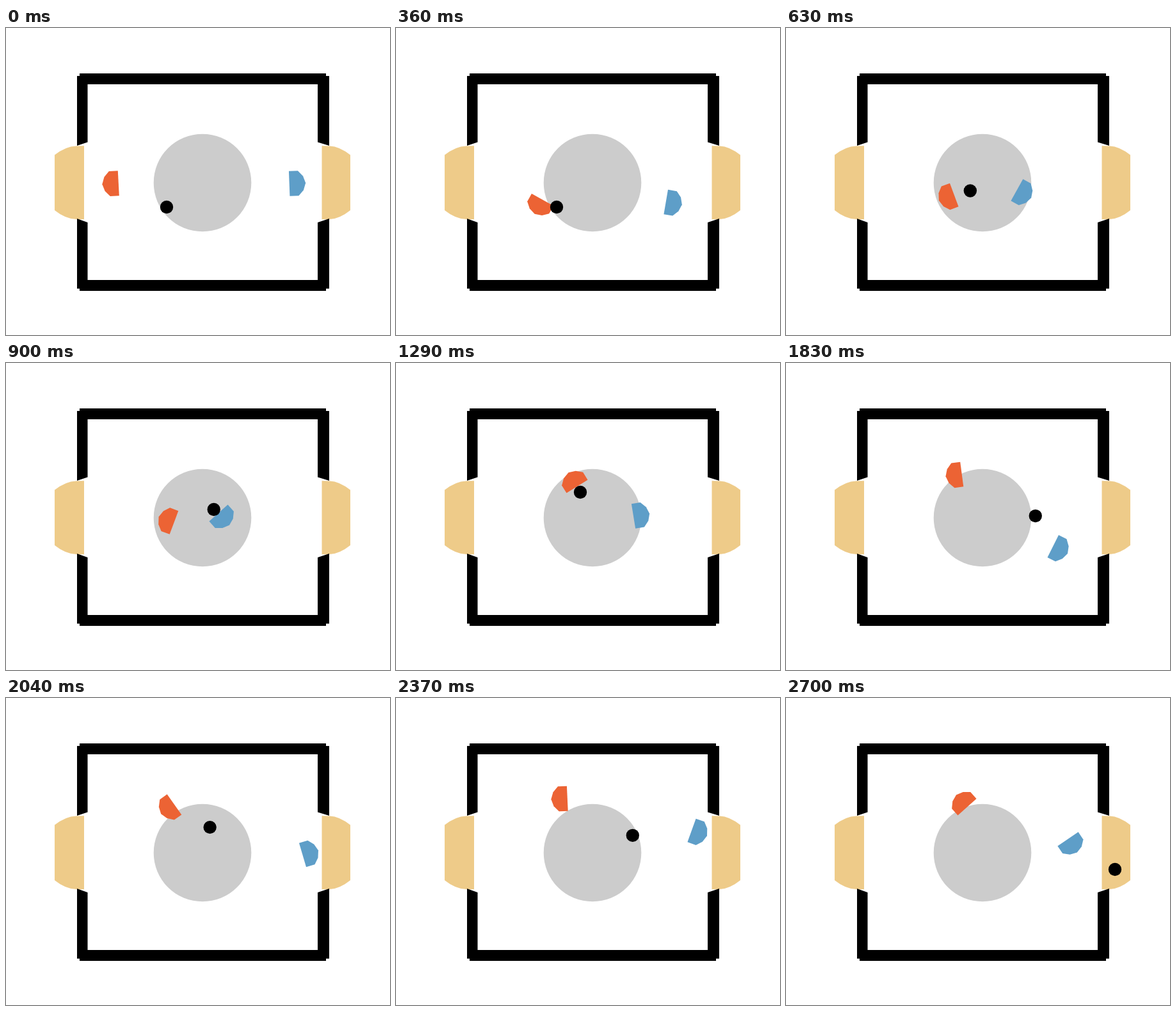
An HTML page with a canvas that plays this animation: 600 by 480 pixels, repeating every 2730 ms.

```html
<!DOCTYPE html>
<html lang="en">
<head>
<meta charset="utf-8">
<title>Table hockey</title>
<style>
  html, body { margin: 0; width: 100%; height: 100%; overflow: hidden; background: #fff; }
  canvas { display: block; }
</style>
</head>
<body>
<canvas id="stage" width="600" height="480"></canvas>
<script>
const ctx = document.getElementById('stage').getContext('2d');
const LOOP = 2730, STEP = 30;

// A beat is a time and a pose; sway bends the way to the next beat into an arc.
const beat = (time, pose, sway = []) => ({ time, pose, sway });

// Mallet poses: centre of the flat face and tilt in degrees.
const RED = [
  beat(0, [175.8, 242.8, -3]),
  beat(360, [229, 268.5, -61], [17, 2]),
  beat(900, [262.5, 249.5, 20.4]),
  beat(1140, [241, 225, 38]),
  beat(1290, [283, 193, 58]),
  beat(1620, [286.5, 181.5, 20.4]),
  beat(2040, [263, 166.5, -35.4]),
  beat(2160, [252, 161, -35], [4, -8]),
  beat(2700, [283, 170.5, 48.2])
];
const BLUE = [
  beat(0, [442.7, 243.3, -2.2], [26, 0]),
  beat(360, [421.7, 272, 9.7], [-16, 0]),
  beat(900, [332, 234.5, 48.2]),
  beat(1290, [371, 239.5, -9.2]),
  beat(1620, [455, 221.5, -50.2], [-42, 53, 60]),
  beat(2040, [463.5, 245.5, -16.5], [10, -26]),
  beat(2700, [440.5, 220.5, 55.9])
];

// The puck runs straight from hit to hit.
const PUCK = [
  beat(360, [251, 280]),
  beat(900, [324.7, 229]),
  beat(1290, [288, 202]),
  beat(1785, [405, 247]),
  beat(2160, [278, 181]),
  beat(2700, [514, 268])
];

function poseAt(beats, t) {
  const next = Math.max(1, beats.findIndex(b => b.time >= t));
  const from = beats[next - 1], to = beats[next];
  const u = Math.max(0, (t - from.time) / (to.time - from.time));
  const arc = Math.sin(Math.PI * u);
  return from.pose.map((p, i) => p + (to.pose[i] - p) * u + (from.sway[i] || 0) * arc);
}

function polygon(color, points) {
  ctx.fillStyle = color;
  ctx.beginPath();
  points.forEach(([x, y]) => ctx.lineTo(x, y));
  ctx.fill();
}

function disc(color, x, y, r) {
  ctx.fillStyle = color;
  ctx.beginPath();
  ctx.arc(x, y, r, 0, Math.PI * 2);
  ctx.fill();
}

function goal(back, front) {
  const dir = Math.sign(front - back);
  ctx.fillStyle = '#eecb89';
  ctx.beginPath();
  for (const side of [-1, 1]) {
    const corner = [
      [front, 57.5], [front - 12 * dir, 57.3], [back + 17 * dir, 56.8], [back, 43.2]
    ].map(([x, y]) => [x, 241.7 + side * y]);
    const [a, b, c, d] = side < 0 ? corner : corner.reverse();
    ctx.lineTo(...a);
    if (side < 0) ctx.lineTo(...b);
    ctx.quadraticCurveTo(...(side < 0 ? [...c, ...d] : [...b, ...c]));
    if (side > 0) ctx.lineTo(...d);
  }
  ctx.fill();
}

function drawTable() {
  ctx.fillStyle = '#fff';
  ctx.fillRect(0, 0, 600, 480);
  disc('#ccc', 307, 242, 76.3);
  goal(76, 122);
  goal(538, 493.5);
  ctx.fillStyle = '#000';
  for (const y of [71, 394]) ctx.fillRect(115, y, 385, 17);
  for (const [outer, inner] of [[111, 127.5], [505, 487]]) {
    polygon('#000', [[outer, 75], [inner, 75], [inner, 178.6], [outer, 184]]);
    polygon('#000', [[outer, 298], [inner, 304], [inner, 407.5], [outer, 407.5]]);
  }
}

function drawMallet(color, [x, y, tilt], side) {
  ctx.save();
  ctx.translate(x, y);
  ctx.rotate(tilt * Math.PI / 180);
  ctx.scale(side, 1);
  const half = [[0, 19.5], [14, 19.5], [21.8, 11]];
  const mirrored = half.map(([px, py]) => [px, -py]).reverse();
  polygon(color, [...half, [25.5, 0], ...mirrored]);
  ctx.restore();
}

function draw(t) {
  drawTable();
  drawMallet('#ec6334', poseAt(RED, t), -1);
  drawMallet('#5e9ec8', poseAt(BLUE, t), 1);
  disc('#000', ...poseAt(PUCK, t), 10.2);
}

const start = performance.now();
function tick() {
  const t = (performance.now() - start) % LOOP;
  draw(Math.floor(t / STEP) * STEP);
  requestAnimationFrame(tick);
}
tick();
</script>
</body>
</html>
```
